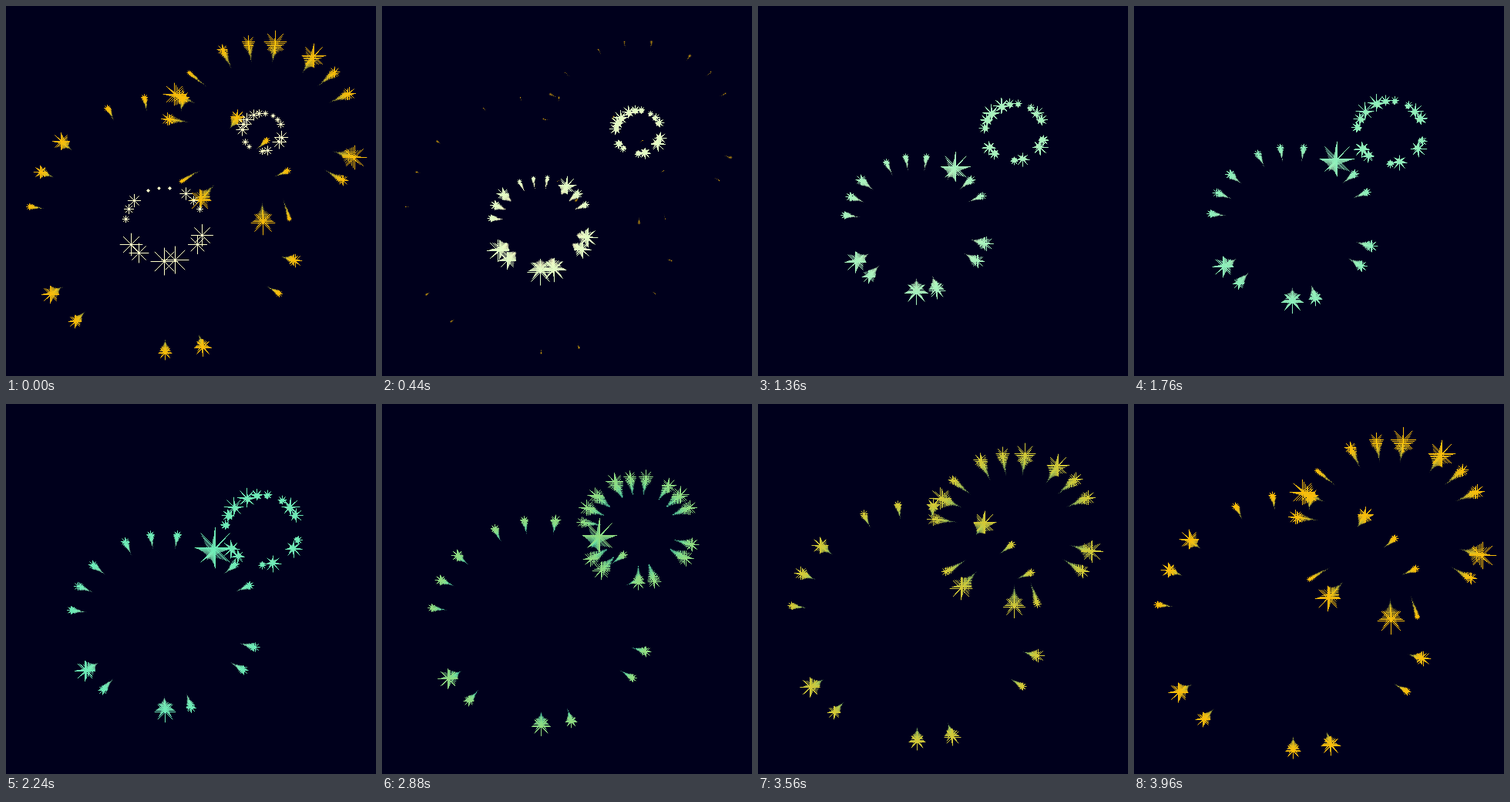
Write an HTML page with a canvas that moves like this. It is 480 by 480 pixels and loops after 4000 ms.

```html
<!DOCTYPE html>
<html>
<head>
<meta charset="utf-8">
<style>
html, body { margin: 0; width: 100%; height: 100%; overflow: hidden; background: #00001c; }
canvas { display: block; width: 480px; height: 480px; }
</style>
</head>
<body>
<canvas id="sky" width="480" height="480"></canvas>
<script>
const ctx = document.getElementById('sky').getContext('2d');
const STEPS = 100, STEP_MS = 40, ECHOES = 18, STARS = 15;
const BACKGROUND = '#00001c';

// Star sizes ripple around each ring between low and high.
const ripple = (low, high, peak, period, sharpness = 1) => k =>
  low + (high - low) *
  ((1 + Math.cos(2 * Math.PI * (k - peak) / period)) / 2) ** sharpness;

// Every property has three keys: start, 60 % of the loop, end.
const COLORS = [[255, 255, 200], [98, 234, 182], [255, 188, 5]];
const bursts = [
  {
    x: 205, y: 283.2, squash: 0.943, radius: [51, 127.5, 178],
    size: [ripple(2, 18, 5.1, 5.75), ripple(5.5, 28, 1, 9.5, 38), ripple(4, 13, 5, 5)]
  },
  {
    x: 332, y: 163, squash: 0.948, radius: [26, 50.5, 126.5],
    size: [ripple(3, 9, 2.6, 3.15), ripple(5, 13, 2, 2.6), ripple(3, 19, 1.2, 2.5)]
  }
];

const mix = (a, b, p) => a + (b - a) * p;

function keyed(keys, u) {
  return u < 0.6 ? mix(keys[0], keys[1], u / 0.6)
                 : mix(keys[1], keys[2], (u - 0.6) / 0.4);
}

function star(x, y, size) {
  const d = size * Math.SQRT1_2;
  ctx.beginPath();
  for (const [dx, dy] of [[size, 0], [0, size], [d, d], [d, -d]]) {
    ctx.moveTo(x - dx, y - dy);
    ctx.lineTo(x + dx, y + dy);
  }
  ctx.stroke();
}

function drawEcho(step, age) {
  const u = ((step - age + STEPS) % STEPS) / STEPS;
  const life = 1 - age / ECHOES;
  const rgb = [0, 1, 2].map(c => Math.round(keyed(COLORS.map(color => color[c]), u)));
  ctx.strokeStyle = `rgb(${rgb})`;
  ctx.globalAlpha = life;
  for (const { x, y, squash, radius, size } of bursts) {
    const r = keyed(radius, u);
    for (let k = 1; k <= STARS; k++) {
      star(
        Math.round(x + r * Math.cos(k)) + 0.5,
        Math.round(y - r * squash * Math.sin(k)) + 0.5,
        keyed(size.map(at => at(k)), u) * life ** 2
      );
    }
  }
}

function draw(now) {
  const step = Math.floor(now / STEP_MS) % STEPS;
  ctx.globalAlpha = 1;
  ctx.fillStyle = BACKGROUND;
  ctx.fillRect(0, 0, 480, 480);
  for (let age = ECHOES - 1; age >= 0; age--) drawEcho(step, age);
}

const start = performance.now();
function tick() {
  draw(performance.now() - start);
  requestAnimationFrame(tick);
}
tick();
</script>
</body>
</html>
```
